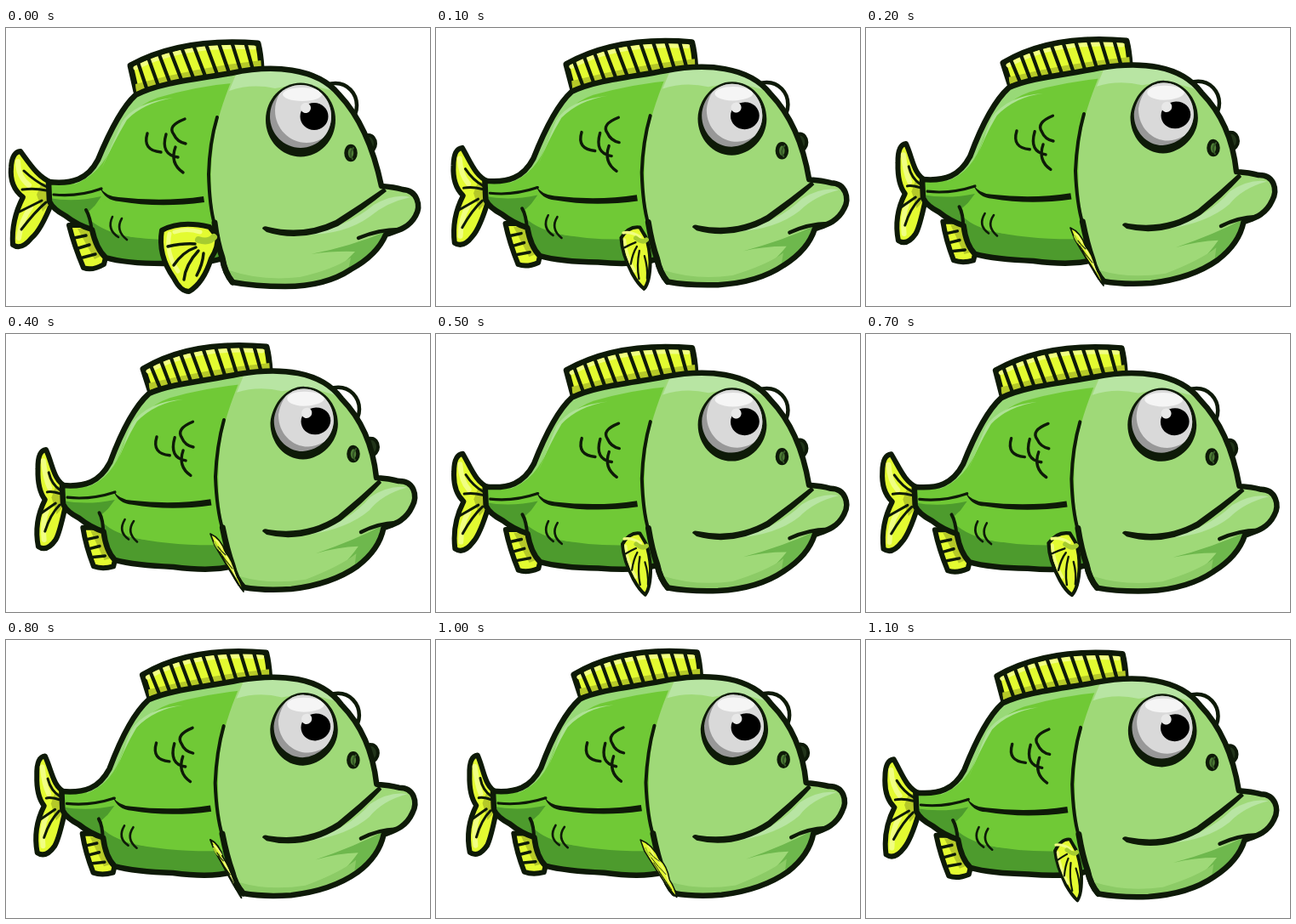
Animation, 498 px wide and 327 px high, one loop 1200 ms. Source, as an HTML page:

```html
<!DOCTYPE html>
<html lang="en">
<head>
<meta charset="utf-8">
<title>Swimming fish</title>
<style>
  html, body { margin: 0; width: 100%; height: 100%; overflow: hidden; background: #fff; }
  svg { display: block; width: 498px; height: 327px; }
  path { stroke-linecap: round; stroke-linejoin: round; }
</style>
</head>
<body>
<svg id="stage" viewBox="0 0 498 327">
  <defs>
    <clipPath id="bodyClip"></clipPath>
    <clipPath id="eyeClip"></clipPath>
    <clipPath id="dorsalClip"></clipPath>
  </defs>
</svg>
<script>
const NS = 'http://www.w3.org/2000/svg';
const stage = document.getElementById('stage');
const INK = '#0e1a08', YELLOW = '#e3fb31', PALE = '#f1ff82', OLIVE = '#b5c928';
const GREEN = '#70c936', DARK = '#4d9b2d', LIGHT = '#98d977', HEAD = '#9fd978', GLOW = '#b8e5a3';

// How far the body is turned at each 100 ms step.
const TURN = [0, .46, 1, 1.17, 1, .48, 0, .42, .96, 1.17, 1.06, .52];
const STEP = 100;

// Anchors of the turn: x, y, dx, dy.
const ANCHORS = [
  [5, 180, 33, -4], [15, 142, 30, -9], [15, 260, 30, -5], [52, 182, 16, -3], [52, 204, 16, -4],
  [112, 190, 16, -3], [98, 175, 14, -4], [125, 115, 11, -5], [150, 78, 16, -9], [147, 42, 15, -3],
  [225, 15, 11, -4], [296, 18, 10, -3], [300, 47, 10, -4], [265, 53, 9, -6], [247, 105, 8, -4],
  [238, 170, 8, -4], [254, 268, 12, 2], [266, 299, 13, -1], [348, 104, 1, -1], [390, 90, 3, -2],
  [405, 147, 3, -6], [430, 135, 3, -3], [303, 237, 0, -4], [443, 190, -6, -17], [485, 208, -4, -19],
  [465, 236, -4, -15], [413, 247, 3, -14], [400, 287, 8, -11], [330, 304, 7, -4], [116, 271, 11, -4],
  [100, 285, 12, -9], [163, 130, 11, -3], [208, 140, 9, -3]
];

function shift(x, y) {
  let sum = 0, dx = 0, dy = 0;
  for (const [ax, ay, sx, sy] of ANCHORS) {
    const w = 1 / ((x - ax) ** 2 + (y - ay) ** 2 + 30) ** 1.6;
    sum += w; dx += w * sx; dy += w * sy;
  }
  return [dx / sum, dy / sum];
}

const PAIR = /(-?[\d.]+),(-?[\d.]+)/g;
const parts = [];

function add(d, style, parent = stage, end = null) {
  const node = document.createElementNS(NS, 'path');
  for (const key in style) node.setAttribute(key, style[key]);
  parent.append(node);
  const pts = [...d.matchAll(PAIR)].map(m => [+m[1], +m[2]]);
  const goal = end && [...end.matchAll(PAIR)].map(m => [+m[1], +m[2]]);
  const moves = pts.map(([x, y], i) => goal ? [goal[i][0] - x, goal[i][1] - y] : shift(x, y));
  parts.push({ node, d, pts, moves });
  return node;
}

const fill = (d, color, clip) =>
  add(d, clip ? { fill: color, 'clip-path': `url(#${clip})` } : { fill: color });
const line = (d, width, color = INK) => add(d, { fill: 'none', stroke: color, 'stroke-width': width });
const shape = (d, color, width) => add(d, { fill: color, stroke: INK, 'stroke-width': width });
const clip = (id, d) => add(d, {}, document.getElementById(id));

function oval(cx, cy, rx, ry) {
  const k = .5523, a = rx * k, b = ry * k;
  return `M${cx - rx},${cy} C${cx - rx},${cy - b} ${cx - a},${cy - ry} ${cx},${cy - ry}` +
    ` C${cx + a},${cy - ry} ${cx + rx},${cy - b} ${cx + rx},${cy}` +
    ` C${cx + rx},${cy + b} ${cx + a},${cy + ry} ${cx},${cy + ry}` +
    ` C${cx - a},${cy + ry} ${cx - rx},${cy + b} ${cx - rx},${cy} Z`;
}

const quad = (a, b, c, t) => [0, 1].map(i =>
  ((1 - t) ** 2 * a[i] + 2 * t * (1 - t) * b[i] + t * t * c[i]).toFixed(1)).join(',');

// Far eye and brow bump
shape(oval(387, 91, 25, 26), '#fff', 4.5);
shape(oval(426, 136, 8, 10), '#22351a', 4);

// Belly fin
shape('M74,232 Q80,256 91,282 Q101,286 115,278 L118,266 L100,232 Z', YELLOW, 6);
fill('M84,236 L97,236 L112,268 L104,272 Z', OLIVE);
line('M80,247 L94,244 M85,259 L98,255 M90,270 L105,266', 3.5);

// Tail
shape('M54,182 C38,176 28,160 17,145 Q7,146 6,164 Q4,187 20,199 Q6,226 8,255 Q18,262 30,247 Q41,238 54,205 Z', YELLOW, 6);
line('M14,157 Q14,175 27,185 M15,247 Q18,225 29,211', 6, PALE);
fill('M54,184 L42,182 L36,196 L43,216 L54,204 Z', OLIVE);
line('M21,168 Q35,181 48,187 M19,190 Q34,188 47,191 M18,237 Q34,216 47,205 M16,216 L42,203', 3);

// Back fin
const top3 = [[146, 44], [207, 11], [296, 18]], base3 = [[153, 75], [225, 54], [300, 47]];
const dorsal = 'M146,44 Q207,11 296,18 Q299,30 300,47 Q225,54 153,75 Z';
clip('dorsalClip', dorsal);
shape(dorsal, YELLOW, 7);
line('M152,47 Q209,18 291,23', 5, PALE);
fill('M152,66 Q225,46 300,38 L300,52 L153,80 Z', OLIVE, 'dorsalClip');
for (let i = 0; i < 10; i++) {
  const t = .07 + i * .094;
  line(`M${quad(...top3, t)} L${quad(...base3, t + .015)}`, 4.2);
}

// Body
const body = 'M50,181 C78,184 96,178 108,155 Q132,97 152,79 C180,64 225,60 265,53 ' +
  'C312,43 365,46 391,78 Q426,115 441,186 Q456,187 466,190 C483,191 488,209 481,221 ' +
  'C473,236 458,239 446,243 Q436,267 405,284 Q375,304 328,304 Q292,304 266,299 ' +
  'Q257,288 254,271 Q230,279 185,277 Q140,277 117,270 Q106,260 101,237 Q84,232 70,221 Q55,213 51,204 Z';
clip('bodyClip', body);
fill(body, GREEN);
fill('M80,184 Q112,172 126,135 Q142,95 178,82 Q225,68 275,64 L275,45 L150,70 L100,150 Z', LIGHT, 'bodyClip');
fill('M112,166 Q126,135 142,108 Q160,89 196,82 Q150,88 136,111 Z', '#aee295');
fill('M45,199 Q78,206 112,198 L98,218 L100,240 L45,220 Z', DARK, 'bodyClip');
fill('M98,225 Q114,240 148,246 Q200,250 250,246 L260,285 L105,285 Z', DARK, 'bodyClip');
fill('M97,216 Q112,199 130,203 Q190,208 236,203 L244,247 Q180,253 133,243 Q112,238 97,216 Z', GREEN);

// Head
fill('M274,40 Q252,90 245,125 Q233,200 254,268 L266,312 L495,312 L495,40 Z', HEAD, 'bodyClip');
fill('M274,45 Q268,60 262,74 Q288,65 316,71 L350,65 L392,76 Q360,42 274,45 Z', GLOW, 'bodyClip');
fill('M358,266 Q405,257 450,238 L444,263 Q405,296 345,310 Q385,291 410,263 Q385,262 358,266 Z', '#6eb84d', 'bodyClip');
fill('M262,285 Q300,298 345,293 Q385,284 405,270 L400,295 L330,312 L262,306 Z', '#8ccb66', 'bodyClip');
fill('M352,243 Q400,235 432,208 Q456,194 475,199 Q447,205 427,222 Q398,243 352,243 Z', GLOW);
line(body, 6.5);

// Side line and scales
line('M56,196 Q84,199 112,189', 3.2);
fill('M110,187 Q117,198 132,199 Q185,205 232,198 L233,205 Q180,212 133,204 Q116,203 110,187 Z', INK);
line('M94,214 Q99,222 101,240', 4);
line('M166,124 Q160,144 182,146 M210,107 Q189,115 197,125 Q201,134 211,136 ' +
  'M188,125 Q181,149 202,152 M199,140 Q192,159 208,170', 3.4);
line('M125,222 Q118,237 132,246 M136,224 Q128,238 142,249', 2.6);

// Gill edge and mouth
line('M248,105 Q239,135 238,172 Q239,210 245,231', 4);
line('M245,229 Q248,253 254,270 Q257,288 266,299', 7);
fill('M301,236 Q302,232 308,234 Q350,244 387,226 Q417,207 444,188 L447,192 Q420,214 390,233 Q346,253 306,240 Z', INK);
line('M414,247 Q438,237 462,237', 4.5);

// Nostril
shape(oval(405, 147, 5.5, 8), '#4d7c35', 4.5);
line('M408,141 Q402,148 407,154', 2, '#345626');

// Near eye
fill(oval(346, 108, 41, 43.5), INK);
const ball = oval(346, 104, 36, 37);
clip('eyeClip', ball);
fill(ball, '#989898');
fill(oval(353, 97, 37, 38), '#d9d9d9', 'eyeClip');
fill(oval(348, 78, 23, 8), '#f5f5f5', 'eyeClip');
fill(oval(362, 104, 16.5, 16), '#000');
fill(oval(352, 94, 6, 6), '#e8e8e8');

// Side fin folds on its own hinge
const finStyle = { fill: YELLOW, stroke: INK };
const fin = add('M239,234 Q205,226 183,238 Q178,267 197,294 Q205,310 215,310 Q232,300 241,271 Q250,257 248,245 Z',
  finStyle, stage,
  'M240,235 Q252,240 258,257 Q266,265 270,283 Q276,292 279,303 Q274,297 264,280 Q252,260 245,248 Z');
const bend = (from, to, color) => add(from, { fill: 'none', stroke: color }, stage, to);
const finGlow = bend('M192,242 Q187,264 202,286 M198,240 Q212,235 228,240',
  'M256,257 Q264,269 270,286 M246,242 Q250,244 254,253', PALE);
const finRoot = bend('M226,249 Q238,253 244,246', 'M245,245 Q249,254 251,253', '#a6cc30');
const finRays = bend('M190,257 Q208,253 222,254 M197,279 Q208,263 223,258 M209,296 Q211,278 226,262 M224,291 Q231,278 232,265',
  'M258,260 Q253,256 249,250 M266,276 Q258,267 251,256 M273,294 Q264,280 254,262 M276,299 Q270,287 260,272', INK);

function draw(turn) {
  for (const { node, d, pts, moves } of parts) {
    let i = 0;
    node.setAttribute('d', d.replace(PAIR, () => {
      const [x, y] = pts[i], [dx, dy] = moves[i++];
      return `${(x + dx * turn).toFixed(2)},${(y + dy * turn).toFixed(2)}`;
    }));
  }
  const thin = Math.max(.25, 1 - .7 * turn);
  fin.setAttribute('stroke-width', 6 * thin);
  finGlow.setAttribute('stroke-width', 5 * thin);
  finRoot.setAttribute('stroke-width', 8 * thin);
  finRays.setAttribute('stroke-width', 3.4 * thin);
}

const start = performance.now();
let shown = -1;
function tick(now) {
  const step = Math.floor(Math.max(0, now - start) / STEP) % TURN.length;
  if (step !== shown) draw(TURN[shown = step]);
  requestAnimationFrame(tick);
}
tick(start);
</script>
</body>
</html>
```
